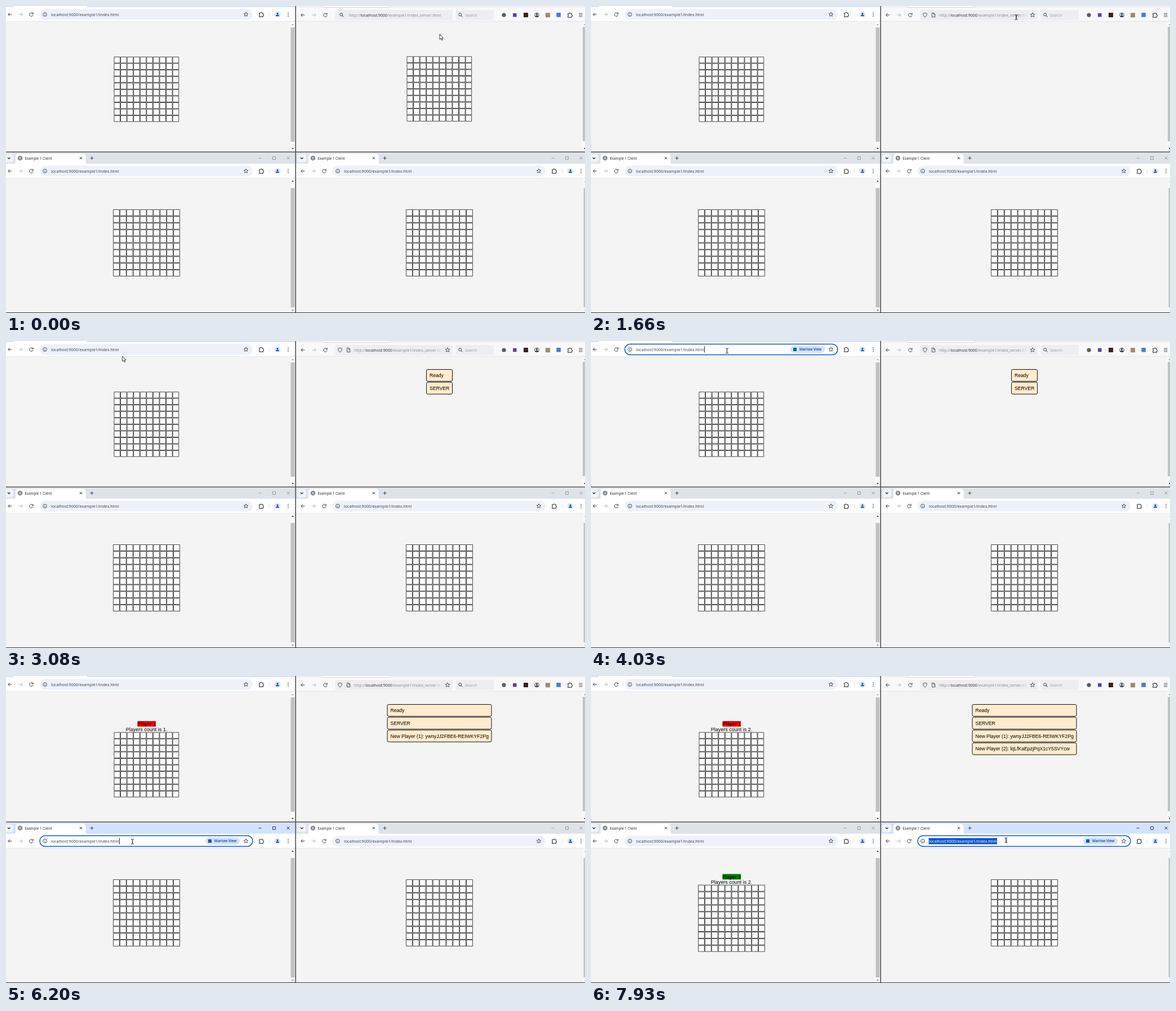
An HTML page that plays this animation: 1028x545 px, repeating every 8 s.

```html
<!DOCTYPE html>
<html lang="en">
<head>
<meta charset="utf-8">
<title>Example 1</title>
<style>
  html, body { margin: 0; width: 100%; height: 100%; overflow: hidden; background: #f4f4f4; }
  svg { display: block; }
  text { font-family: "Open Sans", "Noto Sans", sans-serif; white-space: pre; }
  .page { font-family: "Liberation Sans", Arial, sans-serif; fill: #000; }
  .panel { filter: drop-shadow(0 1px 3px rgba(0, 0, 0, .28)); }
</style>
</head>
<body>
<svg id="stage" width="100%" height="100%" viewBox="0 0 1028 545" xmlns="http://www.w3.org/2000/svg"></svg>
<script>
const LOOP = 8000;
const INK = '#3c4043', PALE = '#b4b6b9', BLUE = '#0b57d0';
const URL_TEXT = 'localhost:9000/example1/index.html';
const MESSAGES = ['Ready', 'SERVER', 'New Player (1): ywnyJJ2FBE6-REIWKYF2Pg',
  'New Player (2): lqLfKaEpzjPqX1cY5SVYcw'];
const BOX_WIDTHS = [37, 47, 186, 186];

// Drawing helpers
const rect = (x, y, w, h, fill, extra = '') =>
  `<rect x="${x}" y="${y}" width="${w}" height="${h}" fill="${fill}" ${extra}/>`;
const line = (d, color = INK, w = 1, extra = '') =>
  `<path d="${d}" fill="none" stroke="${color}" stroke-width="${w}" ${extra}/>`;
const text = (x, y, size, str, fill = '#202124', extra = '') =>
  `<text x="${x}" y="${y}" font-size="${size}" fill="${fill}" ${extra}>${str}</text>`;
const ring = (x, y, r, color = INK, w = 1) =>
  `<circle cx="${x}" cy="${y}" r="${r}" fill="none" stroke="${color}" stroke-width="${w}"/>`;
const dot = (x, y, r, fill) => `<circle cx="${x}" cy="${y}" r="${r}" fill="${fill}"/>`;
const group = (id, body, extra = '') => `<g id="${id}" ${extra}>${body}</g>`;

// Icons
const arrow = (x, y, dir, color) =>
  line(`M${x - 3.3 * dir} ${y}h${6.6 * dir}m${-3 * dir} -3l${3 * dir} 3l${-3 * dir} 3`, color);
const reload = (x, y) =>
  line(`M${x + 2.7} ${y - 1.6}A3.2 3.2 0 1 0 ${x + 3.1} ${y + .9}M${x + 3.2} ${y - 3.6}v2.6h-2.6`);
const cross = (x, y, r, color = INK) =>
  line(`M${x - r} ${y - r}l${2 * r} ${2 * r}M${x + r} ${y - r}l${-2 * r} ${2 * r}`, color, 1);
const lens = (x, y, color = INK) =>
  ring(x - .8, y - .8, 2.5, color) + line(`M${x + 1} ${y + 1}l2.6 2.6`, color);
const globe = (x, y, color = INK) =>
  ring(x, y, 3.6, color, .9) +
  line(`M${x - 3.4} ${y - 1.2}h6.8m0 2.4h-6.8M${x} ${y - 3.6}c-2.4 2.4 -2.4 4.8 0 7.2c2.4 -2.4 2.4 -4.8 0 -7.2`, color, .6);
function star(x, y, r, stroke, fill = 'none') {
  const pts = Array.from({ length: 10 }, (_, i) => {
    const a = i * Math.PI / 5 - Math.PI / 2, q = i % 2 ? r * .45 : r;
    return `${(x + q * Math.cos(a)).toFixed(2)},${(y + q * Math.sin(a)).toFixed(2)}`;
  });
  return `<polygon points="${pts.join(' ')}" fill="${fill}" stroke="${stroke}" stroke-width=".9"/>`;
}
const puzzle = (x, y) =>
  line(`M${x - 3.3} ${y - 2.5}h2.2a1.3 1.3 0 0 1 2.6 0h1.8v2.2a1.3 1.3 0 0 1 0 2.6v1.8h-6.6v-2.3a1.2 1.2 0 0 0 0 -2.3z`, INK, 1.1);
const info = (x, y) => ring(x, y, 3.4, INK, .9) +
  line(`M${x} ${y - 1.9}v.9m0 1v2.1`, INK, .9);
const person = (x, y, color) => dot(x, y - 1.4, 1.6, color) +
  `<path d="M${x - 3} ${y + 3}c0 -3.2 6 -3.2 6 0z" fill="${color}"/>`;
const triangle = (x, y, dir, color) =>
  `<path d="M${x - 2} ${y - dir}h4l-2 ${2.2 * dir}z" fill="${color}"/>`;

function grid(x, y, pitch) {
  let d = '';
  const s = pitch - 1;
  for (let i = 0; i < 100; i++) {
    const cx = x + .5 + i % 10 * pitch, cy = y + .5 + Math.floor(i / 10) * pitch;
    d += `M${cx.toFixed(2)} ${cy.toFixed(2)}h${s}v${s}h${-s}z`;
  }
  return `<path d="${d}" fill="#fff" stroke="#1c1c1c" stroke-width=".8"/>`;
}

const scrollbar = (x, top, bottom, thumbTop, thumbEnd, upColor, downColor) =>
  rect(x, top, 8, bottom - top, '#fafafa') +
  rect(x + .5, thumbTop, 7, thumbEnd - thumbTop, '#c1c1c1') +
  triangle(x + 4, top + 5, -1, upColor) + triangle(x + 4, bottom - 5, 1, downColor);

// Toolbar shared by the client windows; y is its centre line
function toolbar(id, y) {
  const url = color => text(80, y + 2.6, 7.1, URL_TEXT, color);
  return rect(-6, y - 13, 520, 25.5, '#fff') + rect(-6, y + 12.2, 520, .8, '#e3e5e8') +
    arrow(7, y, -1, INK) + arrow(26, y, 1, PALE) + reload(45, y) +
    rect(60, y - 9.5, 378, 19, '#edf1fa', `rx="9.5" id="${id}Pill"`) +
    info(69, y) + url('#3a3d42') +
    group(id + 'Focus',
      rect(354, y - 6.5, 61, 13, '#d3e3fd', 'rx="6.5"') +
      rect(359, y - 3, 6, 6, BLUE) +
      text(370, y + 2.4, 6.4, 'Marlow View', '#0842a0', 'font-weight="600"')) +
    group(id + 'Select', rect(79.5, y - 5.3, 121.5, 11, BLUE) + url('#fff')) +
    rect(201, y - 5.5, .9, 11, '#111', `id="${id}Caret"`) +
    star(426, y, 4, INK) + puzzle(453, y) + rect(467, y - 4, .8, 8, '#cfdcf2') +
    dot(482, y, 5.6, '#dce7fb') + person(482, y, '#174ea6') +
    [-3, 0, 3].map(k => dot(501, y + k, .85, INK)).join('');
}

const player = (id, y, name, color) => group(id,
  rect(233.5, y, 32.5, 9.8, color) +
  text(249.7, y + 8, 9, name, '#000', 'class="page" text-anchor="middle"') +
  text(249.5, y + 17.6, 9, '', '#000', `class="page" text-anchor="middle" id="${id}Count"`));

function lowerWindow(id, x) {
  return `<g transform="translate(${x})">` + rect(-6, 260, 520, 285, '#f4f4f4') +
    rect(-6, 260, 520, 22, '#dee3ea', `id="${id}Strip"`) +
    rect(-3, 262.5, 16, 15, '#f0f3f8', 'rx="4.5"') + line('M3 269l2.3 2.2l2.3 -2.2', '#202124', 1.1) +
    '<path d="M13 281q4 0 4 -4v-10q0 -4.5 4.500 -4.500h115.500q4.500 0 4.500 4.500v10q0 4 4 4z" fill="#fff"/>' +
    globe(25, 270) + text(33.5, 272.5, 6.2, 'Example 1 Client') + cross(133, 270, 2.1) +
    line('M149.500 270h6m-3 -3v6') +
    group(id + 'Controls', '<path d="M448.500 270h5.200M473.500 267.500h5v5h-5zM498.500 267.500l5 5m0 -5l-5 5" fill="none" stroke-width=".9"/>') +
    toolbar(id, 293) +
    scrollbar(505, 306, 545, 323, 535, '#333', '#777') +
    group(id + 'Grid', grid(190, 361, 11.9)) +
    (id === 'bl' ? player('p2', 351.5, 'Player 2', '#008000') : '') + '</g>';
}

function upperClient() {
  return rect(0, 0, 514, 259, '#f4f4f4') + rect(0, 0, 514, 3, '#d3e3fd') + rect(14, 0, 130, 3, '#fff') +
    toolbar('tl', 15) + scrollbar(505, 28, 258, 38, 241, '#999', '#333') +
    group('tlGrid', grid(191.5, 90, 11.57)) + player('p1', 80, 'Player 1', '#ff0000');
}

// Address line of the server window with its host emphasised
const serverUrl = (x, color, host) => text(x, 18.8, 7.03,
  `http://<tspan fill="${host}">localhost:9000</tspan>/example1/index_server.html`, color);

function suggestions() {
  return group('drop',
    rect(582, 4, 213, 121.5, '#fff', 'rx="2" class="panel"') +
    lens(596, 16) + rect(609, 10, 164, 11.5, '#0078d7') + serverUrl(609, '#fff', '#fff') +
    arrow(784, 16, 1, INK) +
    rect(586, 31, 206, 16.5, '#e0e0e6', 'rx="2"') + globe(597, 39.5) +
    text(609, 42.3, 7.05, 'Example 1 Server  —', '#15141a') +
    '<svg x="679" y="31" width="108.500" height="16">' +
    text(0, 11.2, 6.15, 'http://localhost:9000/example1/index_server.html', '#15141a', 'font-weight="700"') + '</svg>' +
    text(588.5, 61, 6.2, 'Brindal Results', '#5b5b66') +
    globe(597, 72) + text(609, 74.7, 7.05, 'Example 1 Server', '#15141a') +
    rect(670, 66, 46, 12.5, '#f0f0f4', 'rx="2"') + text(674, 74.6, 6.1, 'Switch to Tab', '#15141a') +
    rect(586, 84, 206, .8, '#e4e4e8') +
    text(588.5, 100.6, 6.95, 'This time, search with:', '#75757e') +
    dot(678.5, 98, 3.4, '#4285f4') + dot(700, 98, 3.4, '#1b74c9') + dot(721.5, 98, 3.8, '#de7b3a') +
    rect(740, 94.8, 6.4, 6.4, '#3a3a3a') +
    star(678.5, 113, 4.2, '#0b5cad', '#0b5cad') +
    line('M696 110h8.500v6h-8.500z', INK, .9) +
    ring(721.5, 113, 3.9, INK, .9) + line('M721.500 110.500v2.700l1.700 1', INK, .9) +
    ring(784, 113, 3.2, INK, 1.3) + ring(784, 113, 1.1, INK, .8));
}

function serverWindow() {
  return rect(515, 0, 513, 259, '#f4f4f4') + rect(515, 0, 513, 27, '#f9f9fb') +
    rect(515, 0, 513, 3, '#f0f0f4') +
    rect(562, -5, 120, 7.5, '#fff', 'rx="2" stroke="#c8c8ce" stroke-width=".7"') +
    rect(562, .3, 72, 2, '#b7d6fb', 'id="loading"') +
    rect(515, 26.8, 513, .7, '#dfdfe4') +
    arrow(527, 16, -1, INK) + arrow(547, 16, 1, PALE) + reload(567, 16) +
    rect(584.5, 7, 208.5, 18, '#eeeef2', 'rx="2"') + rect(798.5, 7, 67.5, 18, '#eeeef2', 'rx="2"') +
    group('typed', lens(596, 16) + serverUrl(609, '#85858c', '#2b2a33')) +
    group('visited',
      line('M593 12.200l3.300 1.200q.2 4.800 -3.300 6.600q-3.500 -1.800 -3.300 -6.600z', INK, .9) +
      line('M605.500 12.300h3l2.300 2.300v5h-5.300zM608.300 12.500v2.300h2.300', INK, .9) +
      '<svg x="618" y="7" width="157" height="18"><g transform="translate(-618 -7)">' +
      serverUrl(618, '#85858c', '#2b2a33') + '</g></svg>' +
      rect(761, 8, 14, 16, 'url(#fade)') + star(784, 16, 4.2, INK)) +
    lens(807, 16) + text(815, 18.7, 6.8, 'Search', '#9a9aa0') +
    dot(884, 16, 3.6, '#5b5b66') + rect(900, 12.8, 6.5, 6.5, '#5b3fa8') +
    rect(919, 12, 8, 8, '#3b2418') +
    ring(942.5, 16, 3.9, INK, .9) + person(942.5, 16, INK) +
    rect(958, 12.2, 8, 8, '#a08a72') + rect(977.3, 12, 7.6, 7.6, '#4a7fc8') +
    puzzle(1001, 16) + line('M1017 13.200h6.500m-6.500 2.800h6.500m-6.500 2.800h6.500', INK, .9) +
    scrollbar(1023.5, 28, 258, 37, 240, '#999', '#333') +
    group('serverGrid', grid(711.5, 89.3, 11.57)) + group('log', '') + suggestions();
}

document.getElementById('stage').innerHTML =
  '<defs><linearGradient id="fade"><stop offset="0" stop-color="#eeeef2" stop-opacity="0"/>' +
  '<stop offset="1" stop-color="#eeeef2"/></linearGradient></defs>' +
  upperClient() + lowerWindow('bl', 0) + lowerWindow('br', 520) + serverWindow() +
  rect(512.8, 0, .8, 545, '#d5d5d5') + rect(513.6, 0, 1.4, 545, '#444') +
  rect(0, 258.4, 1028, 1.5, '#5a504b') + rect(0, 544, 1028, 1, '#333') +
  group('pointer', '<path d="M0 0V9.300L2.100 7.400L3.600 10.700L5 10.100L3.600 6.900H6.400Z" fill="#fff" stroke="#111" stroke-width=".8"/>') +
  group('beam', line('M-2.500 -4.500q2.500 0 2.500 1.300v6.400q0 1.300 -2.500 1.300M2.500 -4.500q-2.500 0 -2.500 1.300v6.400q0 1.300 2.500 1.300', '#111', .9));

const $ = id => document.getElementById(id);
const show = (id, on) => $(id).setAttribute('display', on ? 'inline' : 'none');
const set = (id, name, value) => $(id).setAttribute(name, value);

// Pointer stops: time, x, y
const PATH = [
  [0, 770, 50], [80, 770, 50], [400, 755, 20], [1660, 755, 20], [1970, 740, 105], [2370, 690, 208],
  [2450, 690, 208], [2900, 84, 60], [3160, 241.5, 17.5], [4620, 241.5, 17.5], [5110, 316, 271],
  [5440, 256, 289], [5830, 210, 289], [6130, 210, 289], [6370, 279, 312.5], [6770, 279, 312.5],
  [6820, 279, 312.5], [7530, 736, 292], [7610, 737, 291.5], [LOOP, 737, 291.5]
];
function pointerAt(t) {
  const i = PATH.findIndex((p, k) => k && t <= p[0]);
  const [t0, x0, y0] = PATH[i - 1], [t1, x1, y1] = PATH[i];
  const u = (t - t0) / (t1 - t0), e = u * u * (3 - 2 * u);
  return [x0 + (x1 - x0) * e, y0 + (y1 - y0) * e];
}
const FIELDS = [[60, 438, 6, 24], [585, 793, 7, 25], [60, 438, 284, 303], [580, 958, 284, 303]];
const overField = (x, y) => FIELDS.some(([a, b, c, d]) => x > a && x < b && y > c && y < d);

function address(id, focused, selected, caret, hover) {
  show(id + 'Focus', focused);
  show(id + 'Select', selected);
  show(id + 'Caret', caret);
  set(id + 'Pill', 'fill', focused ? '#fff' : hover ? '#e2e7ee' : '#edf1fa');
  set(id + 'Pill', 'stroke', focused ? BLUE : 'none');
  set(id + 'Pill', 'stroke-width', 1.5);
}
function activate(id, on) {
  set(id + 'Strip', 'fill', on ? '#d3e3fd' : '#dee3ea');
  set(id + 'Controls', 'stroke', on ? '#1f1f1f' : '#909499');
}
function join(id, gridId, joined, count) {
  show(id, joined);
  set(gridId, 'transform', `translate(0 ${joined ? 9.7 : 0})`);
  $(id + 'Count').textContent = `Players count is ${count}.`;
}

let logged = -1;
function log(count) {
  if (count === logged) return;
  logged = count;
  const w = BOX_WIDTHS[count - 1], x = 769.5 - w / 2;
  $('log').innerHTML = MESSAGES.slice(0, count).map((m, i) => {
    const y = 50 + i * 22.75;
    return rect(x + .5, y + .5, w - 1, 21, '#ffebcd', 'rx="2.500" stroke="#111" stroke-width="1"') +
      text(x + 5.9, y + 14.1, 8.67, m, '#000', 'class="page"');
  }).join('');
}

function draw(t) {
  const within = (a, b) => t >= a && t < b;
  show('drop', within(560, 1660));
  show('typed', t < 1660);
  show('visited', t >= 1660);
  show('serverGrid', t < 1660);
  show('loading', within(1740, 2300));
  log([1740, 2590, 4820, 6800].filter(at => t >= at).length);

  address('tl', within(3880, 4660), within(3880, 4030), within(4030, 4490), false);
  address('bl', within(5970, 6210), within(5970, 6050), within(6050, 6210), within(5400, 7760));
  address('br', t >= 7760, t >= 7930, false, false);
  activate('bl', within(5970, 7760));
  activate('br', t >= 7760);
  const count = t >= 6750 ? 2 : 1;
  join('p1', 'tlGrid', t >= 4820, count);
  join('p2', 'blGrid', t >= 6750, count);

  const [x, y] = pointerAt(t), beam = overField(x, y);
  show('beam', beam);
  show('pointer', !beam);
  set(beam ? 'beam' : 'pointer', 'transform', `translate(${x.toFixed(2)} ${y.toFixed(2)})`);
}

const start = performance.now();
function tick() {
  draw((performance.now() - start) % LOOP);
  requestAnimationFrame(tick);
}
tick();
</script>
</body>
</html>
```
